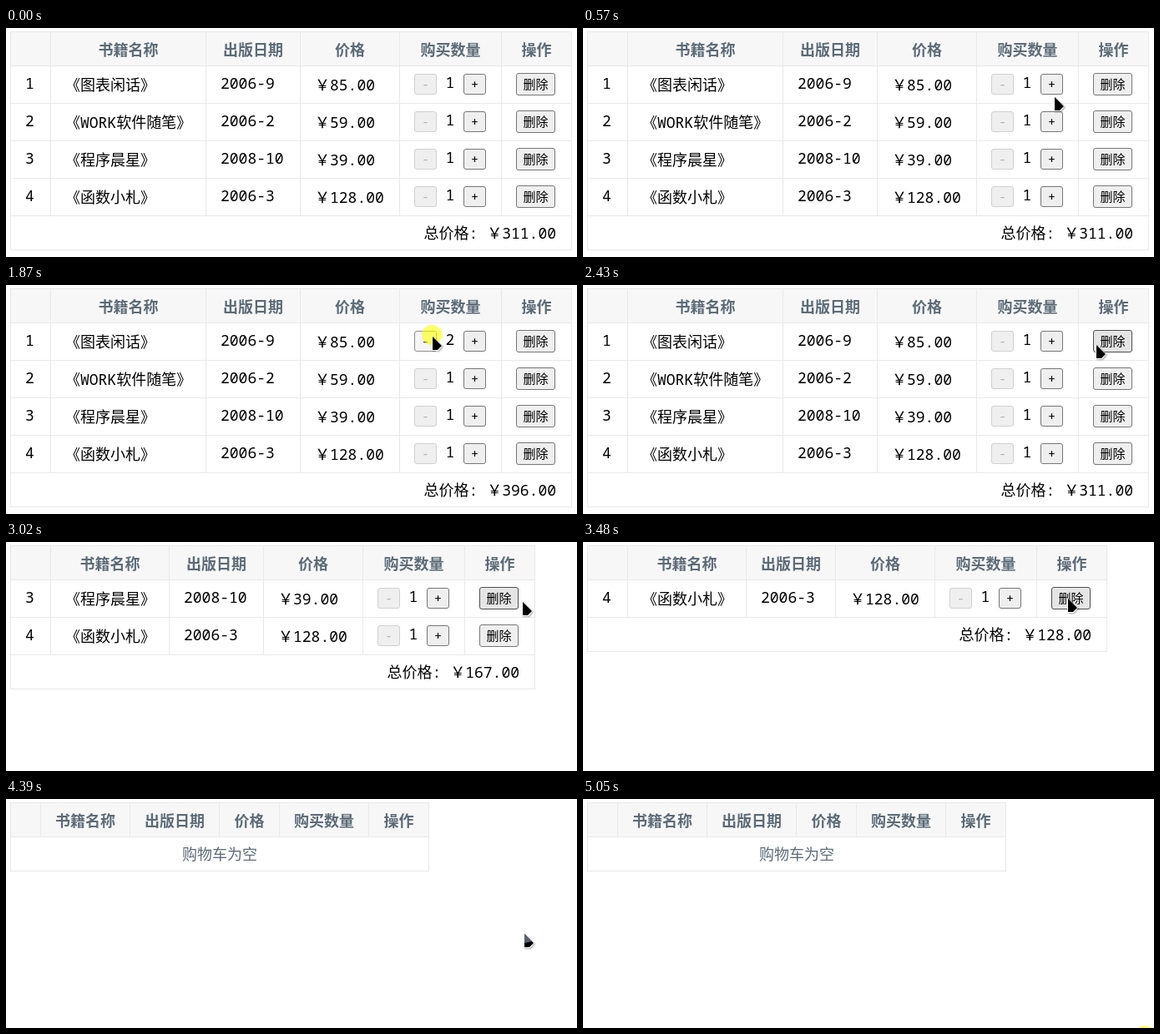
An HTML page with a canvas that plays this animation: 684 by 275 pixels, repeating every 5180 ms.

```html
<!DOCTYPE html>
<html lang="zh-CN">
<head>
<meta charset="utf-8">
<title>购物车</title>
<style>
html, body { margin: 0; width: 100%; height: 100%; overflow: hidden; background: #fff; }
canvas { display: block; }
</style>
</head>
<body>
<canvas id="stage" width="684" height="275"></canvas>
<script>
const ctx = document.getElementById('stage').getContext('2d');
const LOOP = 5180, HOLD = 80;
const LEFT = 5, TOP = 4, HEAD = 41, ROW = 45, PAD = 18, SIZE = 18;
const HEADERS = ['', '书籍名称', '出版日期', '价格', '购买数量', '操作'];
const BOOKS = [
  { id: 1, title: '《图表闲话》', date: '2006-9', price: 85 },
  { id: 2, title: '《WORK软件随笔》', date: '2006-2', price: 59 },
  { id: 3, title: '《程序晨星》', date: '2008-10', price: 39 },
  { id: 4, title: '《函数小札》', date: '2006-3', price: 128 }
];

// Evenly spaced clicks; each takes effect on release
const CLICKS = {
  add: { first: 690, every: 155, times: 3 },
  subtract: { first: 1530, every: 170, times: 3 },
  remove: { first: 2510, every: 430, times: 4 },
  finish: { first: 5050, every: LOOP, times: 1 }
};

const START = { x: 640, y: 242 };
const MOVES = [
  { from: 160, to: 670, x: 557, y: 66 },
  { from: 1230, to: 1500, x: 511, y: 62 },
  { from: 2000, to: 2400, x: 615, y: 72 },
  { from: 2440, to: 2500, x: 619, y: 72 },
  { from: 3170, to: 3360, x: 581, y: 68 },
  { from: 4160, to: 4670, x: 674, y: 286 }
];

const yuan = n => '\uffe5' + n.toFixed(2);
const clamp = (v, lo, hi) => Math.max(lo, Math.min(hi, v));

function released({ first, every, times }, t) {
  return clamp(Math.floor((t - first - HOLD) / every) + 1, 0, times);
}

function isPressed({ first, every, times }, t) {
  const since = t - first;
  return since >= 0 && since < every * times && since % every < HOLD;
}

function pointerAt(t) {
  let { x, y } = START;
  for (const move of MOVES) {
    const p = clamp((t - move.from) / (move.to - move.from), 0, 1);
    const eased = p * p * (3 - 2 * p);
    x += (move.x - x) * eased;
    y += (move.y - y) * eased;
  }
  return { x, y };
}

// Latin runs are monospaced, everything else uses the CJK face
function setFont(run, size, weight) {
  const family = run.charCodeAt(0) < 256
    ? '"Noto Sans Mono", monospace'
    : '"Noto Sans CJK SC", "Noto Sans CJK", sans-serif';
  ctx.font = `${weight} ${size}px ${family}`;
}

function text(str, x, y, { size = SIZE, weight = 350, color = '#000', align = 0 } = {}) {
  const runs = str.match(/[\x00-\xff]+|[^\x00-\xff]+/g) || [];
  const widths = runs.map(run => {
    setFont(run, size, weight);
    return ctx.measureText(run).width;
  });
  x -= align * widths.reduce((a, b) => a + b, 0);
  ctx.fillStyle = color;
  runs.forEach((run, i) => {
    setFont(run, size, weight);
    ctx.fillText(run, x, y);
    x += widths[i];
  });
}

const BUTTON_STYLES = {
  normal: { fill: '#efefef', border: '#767676', color: '#000' },
  hover: { fill: '#e5e5e5', border: '#4f4f4f', color: '#000' },
  active: { fill: '#f5f5f5', border: '#8d8d8d', color: '#000' },
  disabled: { fill: '#efefef', border: '#d0d0d0', color: '#b3b3b3' }
};

function button(label, x, y, w, h, mouse, disabled = false) {
  const over = mouse.x >= x && mouse.x < x + w && mouse.y >= y && mouse.y < y + h;
  const state = disabled ? 'disabled' : !over ? 'normal' : mouse.pressed ? 'active' : 'hover';
  const { fill, border, color } = BUTTON_STYLES[state];
  ctx.beginPath();
  ctx.roundRect(x + .5, y + .5, w - 1, h - 1, 2.5);
  ctx.fillStyle = fill;
  ctx.fill();
  ctx.strokeStyle = border;
  ctx.stroke();
  text(label, x + w / 2, y + h / 2 + 5, { size: 15, color, align: .5 });
}

function columnEdges(books) {
  const has = id => books.some(book => book.id === id);
  const widths = books.length
    ? [48, has(2) ? 186 : 142, has(3) ? 113 : 107, 119, 122, 84]
    : HEADERS.map(label => label.length * SIZE + 36 - label.length / 4 || 37).map(Math.round);
  const edges = [LEFT];
  widths.forEach((w, i) => edges.push(edges[i] + w));
  return edges;
}

function drawGrid(xs, footer, bottom) {
  const width = xs[6] - LEFT;
  ctx.fillStyle = '#f7f7f7';
  ctx.fillRect(LEFT, TOP, width, HEAD);
  ctx.fillStyle = '#e9e9e9';
  for (let y = TOP + HEAD; y <= footer; y += ROW) ctx.fillRect(LEFT, y, width + 1, 1);
  for (const y of [TOP, bottom]) ctx.fillRect(LEFT, y, width + 1, 1);
  xs.forEach((x, i) => ctx.fillRect(x, TOP, 1, (i % 6 ? footer : bottom) - TOP));
}

function drawTable(books, firstCount, mouse) {
  const xs = columnEdges(books);
  const right = xs[6];
  const footer = TOP + HEAD + books.length * ROW;
  const slate = { color: '#5c6b77', align: .5 };
  drawGrid(xs, footer, footer + HEAD);
  HEADERS.forEach((label, i) =>
    text(label, (xs[i] + xs[i + 1] + 1) / 2, TOP + 29, { ...slate, weight: 700 }));

  if (!books.length) {
    text('购物车为空', (LEFT + right + 1) / 2, footer + 28, slate);
    return;
  }

  const [idX, titleX, dateX, priceX, countX, actionX] = xs.map(x => x + PAD);
  let total = 0;
  books.forEach((book, i) => {
    const y = TOP + HEAD + i * ROW;
    const count = book.id === 1 ? firstCount : 1;
    total += book.price * count;
    text(String(book.id), idX, y + 28);
    text(book.title, titleX, y + 30);
    text(book.date, dateX, y + 28);
    text(yuan(book.price), priceX, y + 30);
    button('-', countX, y + 10, 27, 25, mouse, count === 1);
    text(String(count), countX + 43, y + 27, { align: .5 });
    button('+', countX + 59, y + 10, 27, 25, mouse);
    button('删除', actionX, y + 9, 47, 27, mouse);
  });
  text('总价格: ' + yuan(total), right - PAD, footer + 28, { align: 1 });
}

function polygon(points, fill) {
  ctx.beginPath();
  points.forEach(([x, y]) => ctx.lineTo(x, y));
  ctx.closePath();
  ctx.fillStyle = fill;
  ctx.fill();
}

function drawPointer({ x, y, pressed }, onEmptyCart) {
  if (pressed) {
    ctx.beginPath();
    ctx.arc(x - 1, y - 2, 12, 0, 7);
    ctx.fillStyle = 'rgba(255,255,0,.6)';
    ctx.fill();
  }
  ctx.save();
  ctx.translate(Math.round(x), Math.round(y));
  ctx.shadowColor = 'rgba(0,0,0,.35)';
  ctx.shadowBlur = 2;
  ctx.shadowOffsetX = ctx.shadowOffsetY = 1;
  polygon([[-1, -1], [12, 11], [7, 17], [-1, 17]], '#fff');
  ctx.shadowColor = 'transparent';
  polygon([[0, 0], [11, 11], [6, 16], [0, 16]], '#000');
  if (onEmptyCart) polygon([[0, 0], [9, 9], [0, 11]], '#56616b');
  ctx.restore();
}

function draw(t) {
  const count = 1 + released(CLICKS.add, t) - released(CLICKS.subtract, t);
  const books = BOOKS.slice(released(CLICKS.remove, t));
  const pressed = Object.values(CLICKS).some(clicks => isPressed(clicks, t));
  const pointer = { ...pointerAt(t), pressed };
  // Hover stays on the shifted button until the mouse moves again
  const mouse = books.length === 2 && t < MOVES[4].from
    ? { ...pointer, x: pointer.x - 10 } : pointer;

  ctx.fillStyle = '#fff';
  ctx.fillRect(0, 0, 684, 275);
  drawTable(books, count, mouse);
  if (t >= MOVES[0].from) drawPointer(pointer, !books.length);
}

const begin = performance.now();
function tick() {
  draw((performance.now() - begin) % LOOP);
  requestAnimationFrame(tick);
}
tick();
</script>
</body>
</html>
```
